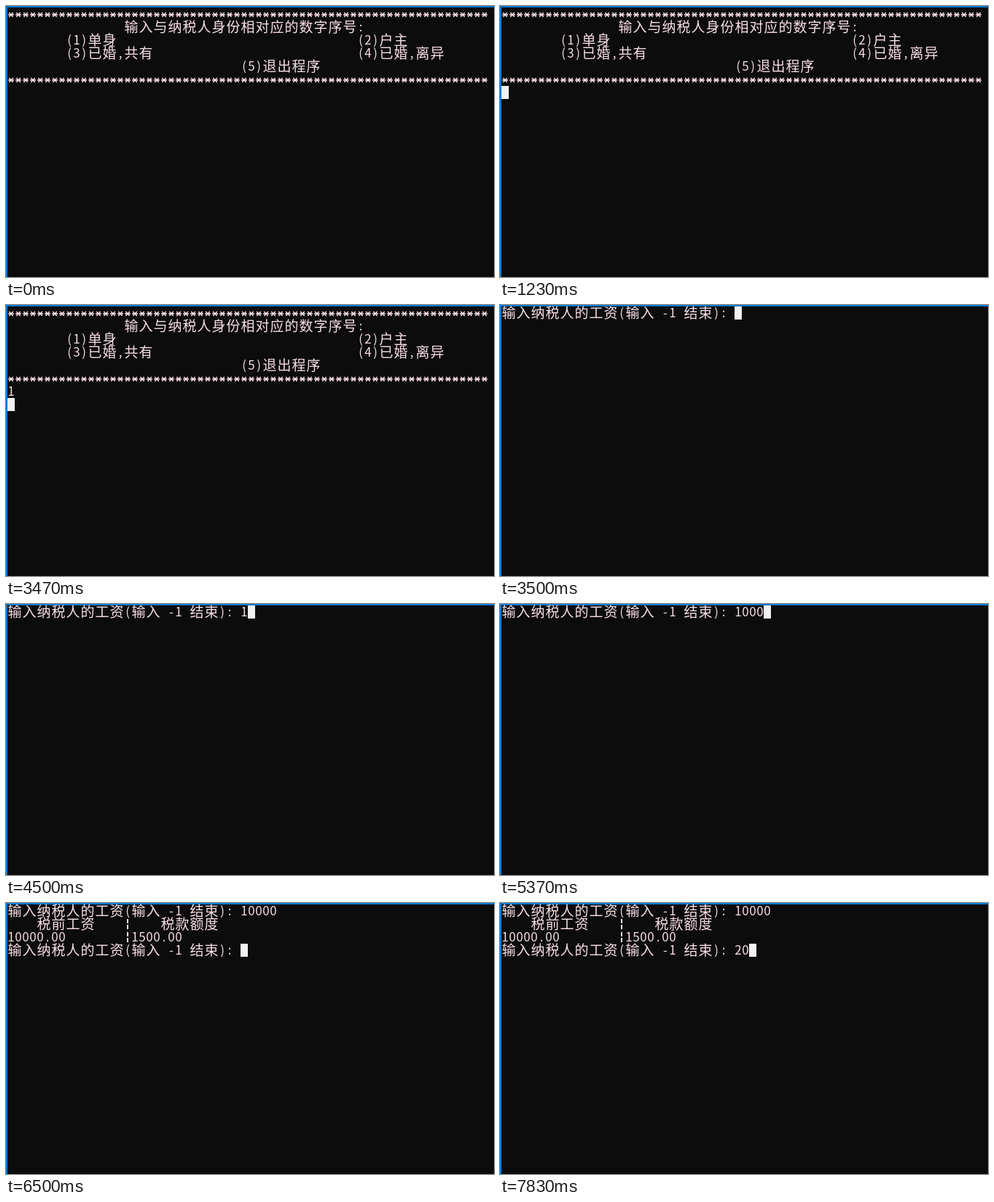
Animation of 670 by 373 pixels, one loop 8 s. Source, as an HTML page with a canvas:

```html
<!DOCTYPE html>
<html lang="zh-CN">
<head>
<meta charset="utf-8">
<style>
html, body { margin: 0; height: 100%; overflow: hidden; background: #0c0c0c; }
canvas { display: block; }
</style>
</head>
<body>
<canvas id="stage" width="670" height="373"></canvas>
<script>
const ctx = document.getElementById('stage').getContext('2d');
const LOOP = 8000, CELL = 10, ROW = 18, LEFT = 2, TOP = 2;
const FAMILY = '"Noto Sans CJK SC", "Noto Sans CJK", "Noto Sans Mono", sans-serif';
const INK = '#f8dfe6';

const gap = n => ' '.repeat(n);
const rule = '*'.repeat(66);
const menu = [
  rule,
  gap(16) + '输入与纳税人身份相对应的数字序号:',
  gap(8) + '(1)单身' + gap(33) + '(2)户主',
  gap(8) + '(3)已婚,共有' + gap(28) + '(4)已婚,离异',
  gap(32) + '(5)退出程序',
  rule, ''
].join('\n');
const prompt = '输入纳税人的工资(输入 -1 结束): ';
const result = prompt + '10000\n' +
  gap(4) + '税前工资' + gap(4) + '¦' + gap(4) + '税款额度\n' +
  '10000.00' + gap(8) + '¦1500.00\n' + prompt;

// Start time, terminal contents, cursor visible
const steps = [
  [0, menu, false],
  [200, menu, true],
  [700, menu, false],
  [1230, menu, true],
  [1800, menu, false],
  [2300, menu, true],
  [2630, menu + '1', true],
  [2830, menu + '1', false],
  [3370, menu + '1', true],
  [3470, menu + '1\n', true],
  [3500, prompt, true],
  [4430, prompt, false],
  [4500, prompt + '1', true],
  [4830, prompt + '10', true],
  [4970, prompt + '10', false],
  [5070, prompt + '100', true],
  [5370, prompt + '1000', true],
  [5500, prompt + '1000', false],
  [5730, prompt + '10000', true],
  [6030, prompt + '10000', false],
  [6470, prompt + '10000\n', true],
  [6500, result, true],
  [7100, result, false],
  [7430, result + '2', true],
  [7630, result + '2', false],
  [7830, result + '20', true]
];

function drawStar(x, y) {
  ctx.beginPath();
  for (const [dx, dy] of [[4, 0], [2.7, 3], [2.7, -3]]) {
    ctx.moveTo(x - dx, y - dy);
    ctx.lineTo(x + dx, y + dy);
  }
  ctx.stroke();
}

function drawTerminal(text, cursorOn) {
  ctx.fillStyle = '#0c0c0c';
  ctx.fillRect(0, 0, 670, 373);
  ctx.fillStyle = '#0078d0';
  ctx.fillRect(0, 0, 670, 2);
  ctx.fillRect(0, 0, 2, 373);

  ctx.fillStyle = ctx.strokeStyle = INK;
  ctx.lineWidth = 1.5;
  ctx.textAlign = 'center';
  let x = LEFT, y = TOP;
  for (const ch of text) {
    if (ch === '\n') {
      x = LEFT;
      y += ROW;
      continue;
    }
    const wide = ch >= '\u4e00';
    const width = wide ? 2 * CELL : CELL;
    if (ch === '*') {
      drawStar(x + 5, y + 10);
    } else if (ch === '¦') {
      ctx.fillRect(x + 4, y + 2, 2, 6);
      ctx.fillRect(x + 4, y + 10, 2, 6);
    } else if (ch !== ' ') {
      ctx.font = (wide ? '300 19px ' : '500 17px ') + FAMILY;
      ctx.fillText(ch, x + width / 2, y + (wide ? 16 : 15));
    }
    x += width;
  }
  if (cursorOn) {
    ctx.fillStyle = '#f2f2f2';
    ctx.fillRect(x, y, CELL, ROW);
  }
}

function tick() {
  const time = performance.now() % LOOP;
  const [, text, cursorOn] = steps.findLast(step => step[0] <= time);
  drawTerminal(text, cursorOn);
  requestAnimationFrame(tick);
}
tick();
</script>
</body>
</html>
```
